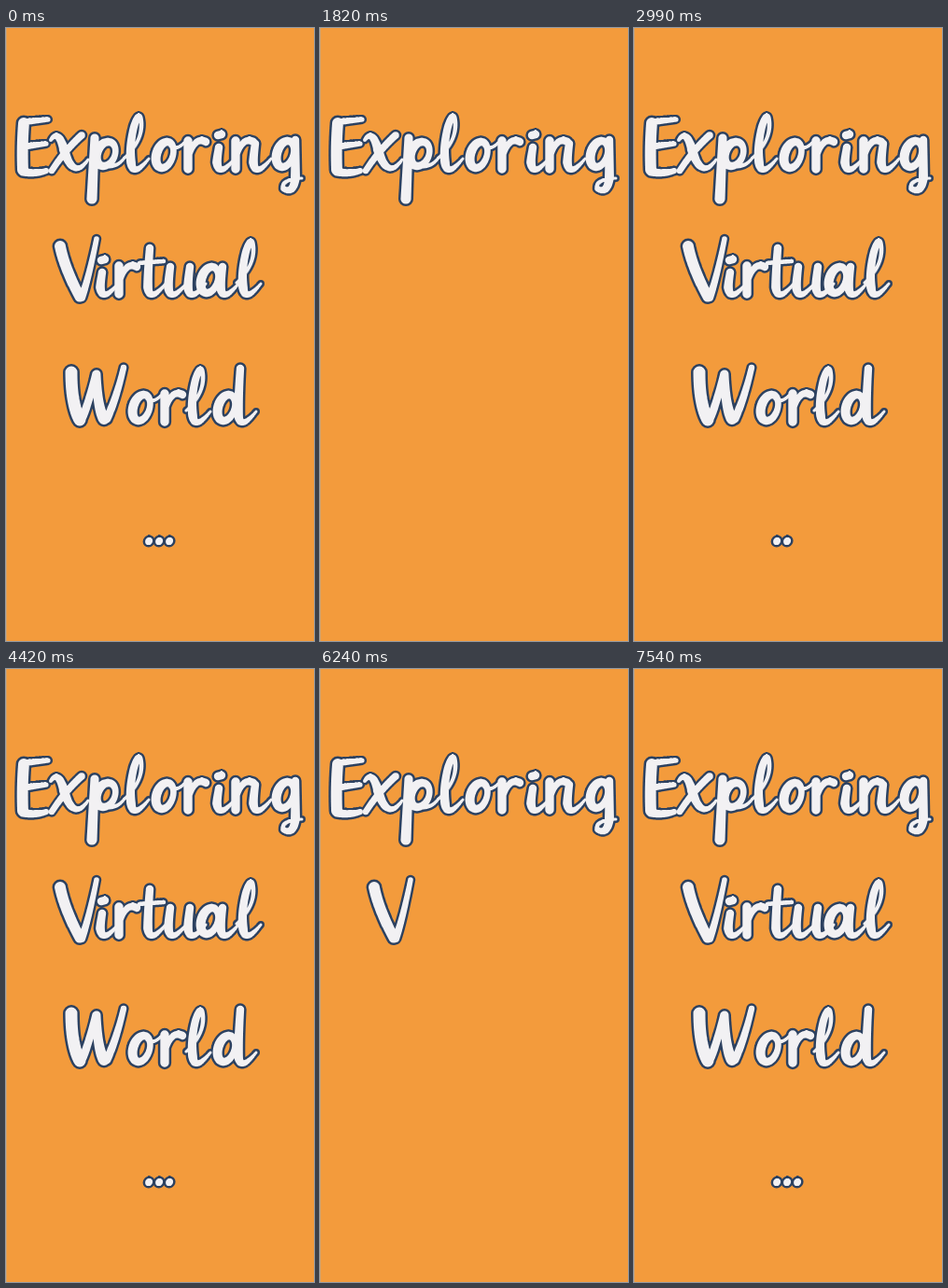
An HTML page with a canvas for the animation above (7.67 s loop, 330 by 657 pixels).

```html
<!DOCTYPE html>
<html lang="en">
<head>
<meta charset="utf-8">
<title>Exploring Virtual World</title>
<style>
  html, body { margin: 0; width: 100%; height: 100%; overflow: hidden; background: #f39b3c; }
  body { box-shadow: inset 1px 0 #d6a267; }
  canvas { display: block; width: 330px; height: 657px; }
</style>
</head>
<body>
<canvas id="stage" width="330" height="657" role="img" aria-label="Exploring Virtual World ..."></canvas>
<script>
const canvas = document.getElementById('stage');
const ctx = canvas.getContext('2d');

const LOOP = 7670, STEP = 130;
const CYCLE = 4360, TYPE_START = 1030, PER_LETTER = 1000 / 12;
const FADE_START = 3620, FADE_TIME = 660;
const INK = '#2c4160', PAPER = '#f2f1f3', OUTLINE = 2.5;

// A stroke maps u in 0..1 to [x, y, brush radius]; y = 0 is the baseline.
const mix = (a, b, u) => a + (b - a) * u;
const bend = (a, b, c, u) => mix(mix(a, b, u), mix(b, c, u), u);

const sweep = (x0, y0, cx, cy, x1, y1, r0, r1) => u =>
  [bend(x0, cx, x1, u), bend(y0, cy, y1, u), mix(r0, r1, u)];

const line = (x0, y0, x1, y1, r0, r1 = r0) => u =>
  [mix(x0, x1, u), mix(y0, y1, u), mix(r0, r1, u)];

// Slanted oval, heavier on its left side.
const ring = (cx, cy = -16, rx = 9, ry = 14) => u => {
  const c = Math.cos(u * 2 * Math.PI), s = Math.sin(u * 2 * Math.PI);
  return [cx + rx * c - 0.2 * ry * s, cy + ry * s, 4.2 - 0.9 * c];
};

const hook = x => sweep(x, -8, x + 2, 9, x + 19, -12, 4.9, 1.5);
const stem = (x, top) => [sweep(x + 1, -top, x - 1, -top / 2, x - 1, -8, 4.2, 4.9), hook(x - 1)];
const arch = x => sweep(0, -9, 6, -37, x, -30, 2.3, 4.2);
const post = line(0, -31, 0, -1, 4.7);

// Width to the next letter, then strokes.
const glyphs = {
  E: [46, sweep(1, -50, -1, -25, 0, 0, 6, 6), line(-1, -51, 27, -54, 3.6, 2.6),
      line(2, -25, 25, -28, 3.6, 2.6), sweep(0, 2, 14, 5, 25, 1, 4.5, 3)],
  x: [30, sweep(-16, -32, -8, -44, -2, -22, 2, 5), sweep(-2, -22, 8, 12, 24, -11, 5.2, 1.6),
      sweep(17, -37, 0, -22, -15, 1, 3.8, 3.2)],
  p: [42, line(1, -34, -2, 31, 4.6, 5.6), ring(13, -17, 10, 13), sweep(15, -4, 26, -3, 33, -13, 2.4, 1.6)],
  l: [34, sweep(-9, -13, 10, -30, 9, -50, 1.6, 2.4), sweep(9, -50, 7, -66, 1, -46, 2.4, 4),
      sweep(1, -46, -4, -26, -2, -8, 4, 4.9), hook(-2)],
  o: [25, ring(0), sweep(6, -26, 12, -20, 21, -29, 2, 1.7)],
  r: [32, post, arch(19)],
  i: [19, line(0, -37, 4, -38, 4.2), stem(0, 24)],
  n: [54, post, arch(19), stem(20, 28)],
  g: [0, ring(-1, -17), line(10, -32, 10, 8, 4.2, 5), sweep(10, 8, 8, 27, -3, 20, 5, 2.8),
      sweep(-3, 20, -5, 10, 17, 9, 2.6, 1.5)],
  V: [44, sweep(0, -52, 5, -28, 21, 2, 6, 5.6), sweep(23, 3, 30, -15, 39, -60, 4, 2.8)],
  t: [22, stem(0, 50), line(-10, -34, 16, -36, 2.2)],
  u: [43, stem(0, 30), stem(21, 30)],
  a: [38, ring(0), stem(13, 30)],
  W: [75, sweep(0, -54, 0, -20, 9, -3, 6.5, 6.5), sweep(11, -4, 18, -18, 26, -52, 4.5, 3.8),
      sweep(27, -52, 28, -15, 35, -4, 4.5, 6), sweep(38, -4, 48, -25, 56, -59, 4.4, 3.2)],
  d: [0, ring(0), stem(14, 58)],
  '.': [11, line(0.5, -0.5, -0.3, 0.5, 3.6)]
};

function brush(path, stroke, dx, dy) {
  for (let k = 0; k <= 60; k++) {
    const [x, y, r] = stroke(k / 60);
    path.moveTo(x + dx + r, y + dy);
    path.arc(x + dx, y + dy, r, 0, Math.PI * 2);
  }
}

function setWord([word, x, base]) {
  return [...word].map(c => {
    const [width, ...strokes] = glyphs[c];
    const path = new Path2D();
    strokes.flat().forEach(s => brush(path, s, x, base));
    x += width;
    return path;
  });
}

const letters = [
  ['Exploring', 18, 152], ['Virtual', 58, 286], ['World', 70, 423], ['...', 153, 550]
].flatMap(setWord);

let shown = -1;

function drawText(count) {
  if (count === shown) return;
  shown = count;
  const visible = letters.slice(0, count);
  ctx.clearRect(0, 0, 330, 657);
  ctx.strokeStyle = INK;
  ctx.lineWidth = OUTLINE * 2;
  visible.forEach(p => ctx.stroke(p));
  ctx.fillStyle = PAPER;
  visible.forEach(p => ctx.fill(p));
}

function frame() {
  const t = Math.floor(performance.now() % LOOP / STEP) * STEP;
  const phase = (t - TYPE_START + CYCLE) % CYCLE;
  const fade = (phase - FADE_START) / FADE_TIME;
  drawText(Math.min(letters.length, Math.floor(phase / PER_LETTER)));
  canvas.style.opacity = 1 - Math.max(0, Math.min(1, fade));
  requestAnimationFrame(frame);
}
frame();
</script>
</body>
</html>
```
